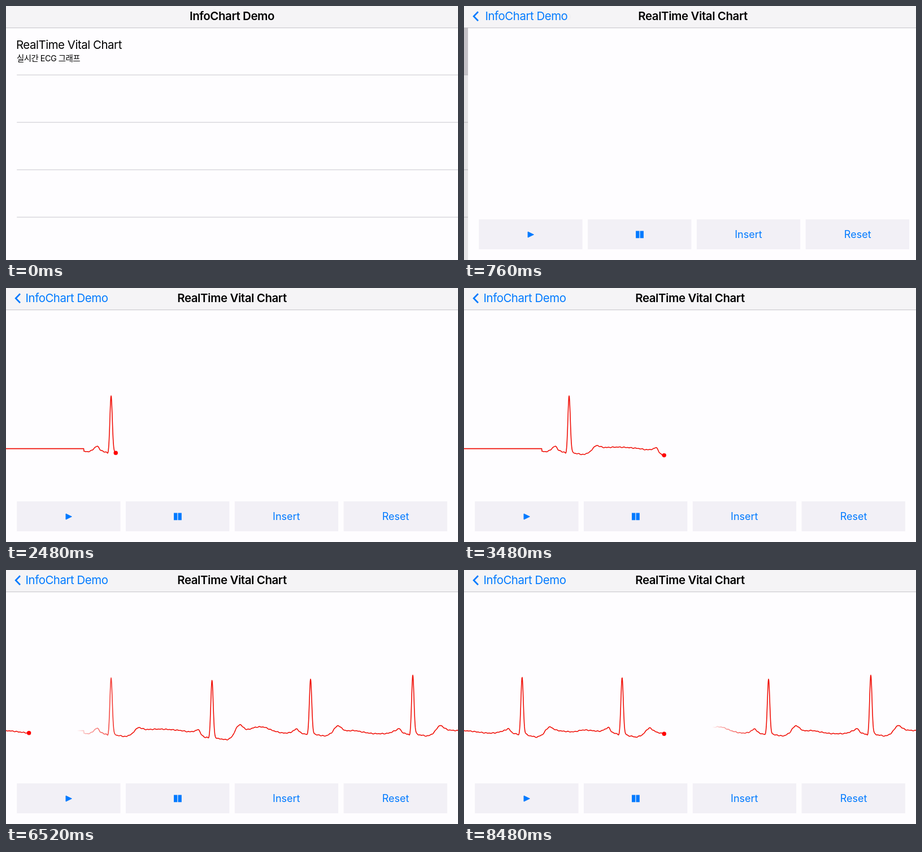
Recreate the animation shown at these times as an HTML page. Size 800x450 px, loop 8520 ms.

```html
<!DOCTYPE html>
<html lang="ko">
<head>
<meta charset="utf-8">
<title>InfoChart Demo</title>
<style>
  html, body { margin: 0; width: 100%; height: 100%; overflow: hidden; background: #fefdff; }
  svg { display: block; width: 100%; height: 100%; }
  text { font: 20.4px Inter, 'Noto Sans CJK KR', 'Noto Sans CJK SC', sans-serif; letter-spacing: -.022em; }
  .title { font-weight: 600; letter-spacing: -.019em; text-anchor: middle; }
  .sub { font-size: 14.4px; letter-spacing: -.5px; }
  .btn { font-size: 18px; letter-spacing: 0; text-anchor: middle; }
  .blue { fill: #007aff; }
</style>
</head>
<body>
<svg viewBox="0 0 800 450">
  <defs>
    <linearGradient id="fade" gradientUnits="userSpaceOnUse" y1="0" y2="0">
      <stop offset="0" stop-color="#f01008" stop-opacity="0"/>
      <stop offset=".2" stop-color="#f01008" stop-opacity=".32"/>
      <stop offset="1" stop-color="#f01008"/>
    </linearGradient>
    <g id="trace">
      <path id="line" fill="none" stroke="url(#fade)" stroke-width="1.6" stroke-linejoin="round"/>
      <circle id="dot" r="3.7" fill="#f00"/>
    </g>
  </defs>

  <rect width="800" height="450" fill="#fefdff"/>
  <g id="list">
    <rect width="800" height="450" fill="#fefdff"/>
    <rect id="pressed" y="38" width="800" height="84" fill="#dad7dd"/>
    <text x="18" y="75.9">RealTime Vital Chart</text>
    <text class="sub" x="19" y="98">실시간 ECG 그래프</text>
    <g id="rules" fill="#c8c7cc"></g>
    <rect id="dim" width="800" height="450"/>
  </g>

  <g id="page">
    <rect width="800" height="450" fill="#fefdff"/>
    <g id="buttons" fill="#f2f0f6"></g>
    <g class="blue">
      <path d="M106 400L116.3 405L106 410Z" stroke="#007aff" stroke-linejoin="round"/>
      <path d="M297 398.6h6.3v12.6h-6.3zM304.5 398.6h6.3v12.6h-6.3z"/>
      <text class="btn" x="496.3" y="411.3">Insert</text>
      <text class="btn" x="689.6" y="411.3">Reset</text>
    </g>
    <g id="chart">
      <use href="#trace"/>
      <use href="#trace" x="-800"/>
    </g>
  </g>

  <rect width="800" height="38.4" fill="#f5f4f6"/>
  <rect y="38.3" width="800" height=".9" fill="#bcbbbf"/>
  <text id="oldTitle" class="title" y="25.3">InfoChart Demo</text>
  <g id="back" class="blue">
    <path d="M25 10.3L17.2 18.3L25 26.3" fill="none" stroke="#007aff" stroke-width="2.7"/>
    <text id="backText" y="25.3">InfoChart Demo</text>
  </g>
  <text id="newTitle" class="title" y="25.3">RealTime Vital Chart</text>
</svg>
<script>
const LOOP = 8520, STEP = 40, W = 800;
const PUSH = 420, PUSH_END = 920, SPEED = 0.16, START = 1266;
const $ = id => document.getElementById(id);
const set = (id, attrs) => {
  for (const k in attrs) $(id).setAttribute(k, attrs[k]);
};
const mix = (a, b, k) => a + (b - a) * k;
const rect = (x, y, w, h) => `<rect x="${x}" y="${y}" width="${w}" height="${h}"/>`;

$('rules').innerHTML = [0, 1, 2, 3].map(i => rect(19.2, 121.6 + 84 * i, 781, 1)).join('');
$('buttons').innerHTML = [0, 1, 2, 3].map(i => rect(19.2 + 192.8 * i, 378, 183.3, 53)).join('');

// Each beat: R position, R peak, P, Q level, Q dip, S, ST sag, T, then the levels up to the next beat
const AFTER = [62, 78, 92, 108, 124, 138];
const BEATS = [
  [186, 190, 280.5, 290, 295, 291, 295, 279.2, 282.5, 282, 282, 283, 284.5, 286.5],
  [364.6, 195, 282.5, 296, 299, 297, 300.5, 274, 282.5, 278.5, 278.5, 284.5, 288.5, 288],
  [539, 193, 281.5, 290, 293.5, 290, 294, 275.8, 284.5, 284.5, 287, 289.5, 290, 289],
  [720, 186, 281, 290, 295, 290, 294, 275.5, 283, 284.5, 285.5, 287.5, 289, 288],
  [902.8, 190, 281, 290, 294, 290, 296, 278, 284, 286, 286.5, 283.5, 284.5, 285.5],
  [1079.8, 190, 279, 289.5, 294, 291, 296, 280, 287.5, 290.5, 291]
];
const FLAT = 284.6, FLAT_END = 138;

const pts = [[FLAT_END, 289.5], [146, 289.8], [152, 287.5]];
for (const [r, , p, q, dip, s, sag, t, ...levels] of BEATS) {
  const wave = [
    [-29, p + 2.5], [-24, p], [-19, mix(p, q, .65)], [-13, q], [-8, q + 1], [-5, dip],
    [6, s], [10, mix(s, sag, .45)], [17, mix(s, sag, .7)], [26, sag], [32, sag - 2.5],
    [37, mix(sag, t, .3)], [43, mix(t, sag, .25)], [49, t], [55, mix(t, levels[0], .5)]
  ];
  levels.forEach((y, i) => wave.push([AFTER[i], y]));
  for (const [dx, y] of wave) pts.push([r + dx, y]);
}

const slope = i => {
  const a = pts[Math.max(i - 1, 0)], b = pts[Math.min(i + 1, pts.length - 1)];
  return (b[1] - a[1]) / (b[0] - a[0]);
};

// Height of the signal at any distance along the strip
function signal(x) {
  if (x < FLAT_END) return FLAT;
  let i = 0;
  while (i < pts.length - 2 && pts[i + 1][0] <= x) i++;
  const [x0, y0] = pts[i], [x1, y1] = pts[i + 1];
  const w = x1 - x0, k = Math.min((x - x0) / w, 1), m = 1 - k;
  let y = y0 * m * m * (1 + 2 * k) + y1 * k * k * (3 - 2 * k)
        + w * k * m * (slope(i) * m - slope(i + 1) * k);
  y += .4 * Math.sin(x * .95) + .3 * Math.sin(x * .61 + 1);
  for (const [r, peak, , , dip, s] of BEATS) {
    const d = (x - r) / 2.1;
    if (Math.abs(d) < 5) y -= ((dip + s) / 2 - peak) * Math.exp(-d * d / 2);
  }
  return y;
}

const samples = Array.from({ length: 2 * 1160 }, (_, i) => signal(i / 2).toFixed(2));

function drawTrace(t) {
  const head = (t - START) * SPEED, tail = head - 715;
  $('chart').style.display = head > -5 ? '' : 'none';
  if (head <= -5) return;
  const y = signal(head);
  let d = '';
  for (let i = Math.max(0, Math.ceil(tail * 2)); i / 2 < head; i++)
    d += (d ? 'L' : 'M') + i / 2 + ' ' + samples[i];
  set('line', { d: d ? d + `L${head} ${y}` : '' });
  set('fade', { x1: tail, x2: tail + 80 });
  set('dot', { cx: head, cy: y });
}

// Critically damped spring
function spring(t, from) {
  if (t >= PUSH_END) return 1;
  const x = Math.max(0, t - from) * .01993;
  return 1 - (1 + x) * Math.exp(-x);
}

function draw(t) {
  const p = spring(t, PUSH), n = spring(t, PUSH + 8);
  set('list', { transform: `translate(${-.3 * W * p})` });
  set('page', { transform: `translate(${W * (1 - p)})` });
  set('pressed', { opacity: t >= 400 ? 1 : 0 });
  set('dim', { opacity: .1 * p });
  set('oldTitle', { x: mix(400, 112, n), opacity: 1 - n });
  set('newTitle', { x: mix(896, 400, n), opacity: n });
  set('back', { opacity: n });
  set('backText', { x: mix(324, 34.5, n) });
  drawTrace(t);
}

function tick() {
  draw(Math.floor(performance.now() % LOOP / STEP) * STEP);
  requestAnimationFrame(tick);
}
tick();
</script>
</body>
</html>
```
